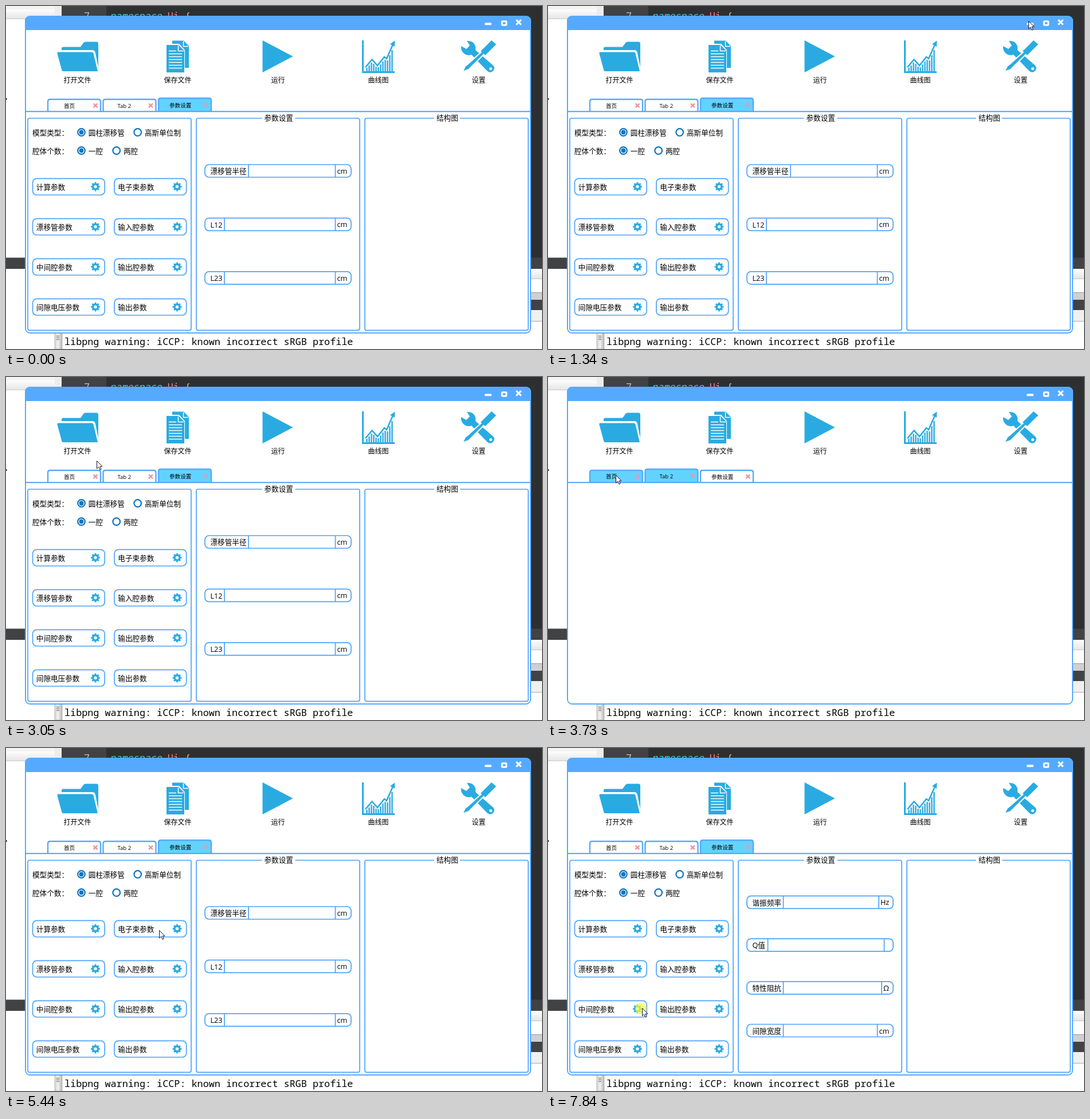
Write an HTML page that moves like this. It is 935x599 px and loops after 8 s.

```html
<!DOCTYPE html>
<html lang="zh-CN">
<head>
<meta charset="utf-8">
<title>参数设置</title>
<style>
html, body { margin: 0; width: 100%; height: 100%; overflow: hidden; background: #fff; }
svg { display: block; width: 935px; height: 599px; }
text { font-family: "Open Sans", "Noto Sans CJK SC", "Noto Sans CJK", sans-serif; font-size: 12.6px; fill: #000; white-space: pre; }
.label { font-size: 12px; text-anchor: middle; }
.tab { font-size: 9.6px; }
.mono { font-family: "Noto Sans Mono", "DejaVu Sans Mono", monospace; font-size: 16.8px; }
.line { fill: none; stroke: #4da3fa; stroke-width: 1.7; }
.icon { fill: #29abe2; }
</style>
</head>
<body>
<svg id="stage" viewBox="0 0 935 599" xmlns="http://www.w3.org/2000/svg">
  <defs>
    <linearGradient id="pale" x2="0" y2="1"><stop stop-color="#fdfdfd"/><stop offset="1" stop-color="#e6e6e8"/></linearGradient>
    <linearGradient id="bar"><stop stop-color="#d2d2d2"/><stop offset=".45" stop-color="#f2f2f2"/><stop offset="1" stop-color="#b4b4b4"/></linearGradient>
    <g id="gear" fill="none" stroke="#29abe2">
      <circle r="4.5" stroke-width="3.4"/>
      <circle r="6.7" stroke-width="2.4" pathLength="16" stroke-dasharray="1" stroke-dashoffset=".5"/>
    </g>
    <path id="cross" d="M-3.4-3.4L3.4 3.4M3.4-3.4L-3.4 3.4" stroke-width="2.4"/>
  </defs>
  <g id="desktop"></g>
  <g id="window"></g>
  <g id="icons"></g>
  <g id="tabs"></g>
  <path d="M34 184.3H915" class="line" style="stroke-width:2"/>
  <g id="page"></g>
  <g id="popup">
    <rect x="120" y="135.5" width="23" height="23" rx="3.5" fill="#f56a6a"/>
    <g fill="none" stroke="#fff" stroke-width="1.3"><circle cx="130.5" cy="145.8" r="4.8"/><path d="M134 149.5L138.5 153.5"/></g>
  </g>
  <circle id="halo" r="10" fill="#ffff35" opacity=".68"/>
  <path id="cursor" d="M.5.5V14L3.7 11L6 16.2L8.2 15.2L6 10.2H10Z" fill="#fff" stroke="#16162a" stroke-width="1"/>
</svg>
<script>
const LOOP = 8000;
const BLUE = '#55aaff';
const $ = id => document.getElementById(id);
const rect = (x, y, w, h, fill, more = '') =>
  `<rect x="${x}" y="${y}" width="${w}" height="${h}" fill="${fill}" ${more}/>`;
const text = (x, y, s, more = '') => `<text x="${x}" y="${y}" ${more}>${s}</text>`;
const box = (x, y, w, h, r) => rect(x, y, w, h, '#fff', `rx="${r}" class="line"`);

// Each step keeps the earlier values it does not name.
const steps = [
  { t: 0, x: -50, y: 0, icon: -1, tab: 2, over: -1, form: 0, popup: 0, halo: 0 },
  { t: 660, x: 881, y: 33 },
  { t: 1010, x: 866, y: 22 },
  { t: 1340, x: 838, y: 26 },
  { t: 1690, x: 704, y: 72 },
  { t: 2020, x: 549, y: 88, icon: 2 },
  { t: 2400, x: 304, y: 92, icon: 1 },
  { t: 2720, x: 128, y: 92, icon: 0 },
  { t: 3050, x: 158, y: 146, icon: -1 },
  { t: 3400, x: 207, y: 172, over: 1 },
  { t: 3730, x: 118, y: 171, tab: 1, over: 0 },
  { t: 4080, x: 120, y: 172, tab: 0 },
  { t: 4410, x: 323, y: 170, over: 2, popup: .5 },
  { t: 4790, x: 309, y: 166, popup: 1 },
  { t: 5110, x: 305, y: 224, tab: 2, over: -1, popup: 0 },
  { t: 5440, x: 267, y: 318 },
  { t: 5810, x: 303, y: 320 },
  { t: 6130, x: 299, y: 342, form: 1 },
  { t: 6480, x: 290, y: 378 },
  { t: 6830, x: 296, y: 440 },
  { t: 7160, x: 299, y: 452, form: 2 },
  { t: 7510, x: 78, y: 452 },
  { t: 7840, x: 164, y: 454, halo: 1 }
];
steps.forEach((s, i) => { steps[i] = { ...steps[i - 1], ...s }; });

function drawDesktop() {
  const dark = '#2e2f30', mid = '#404244';
  $('desktop').innerHTML =
    rect(0, 0, 935, 599, '#fff') +
    rect(0, 0, 97, 6, '#f4f4f5') + rect(0, 6, 85, 16, 'url(#pale)') + rect(0, 22, 85, 1, '#c9c9cb') +
    rect(85, 0, 12, 30, '#ededee') +
    rect(97, 0, 838, 440, dark) + rect(97, 0, 78, 40, mid) +
    text(136, 23, '7', 'class="mono" style="fill:#bebec0"') +
    text(181, 23, '<tspan fill="#45c6d6" font-style="italic">namespace</tspan> <tspan fill="#ff8080">Ui</tspan> <tspan fill="#d6cf9a">{</tspan>', 'class="mono"') +
    rect(0, 439.5, 935, 19.5, mid) +
    rect(0, 161, 1.5, 3, '#222') +
    rect(900, 459, 35, 17, 'url(#pale)') + rect(900, 476, 35, 1, '#c4c4c4') +
    rect(900, 500, 35, 1, '#999') + rect(900, 501, 35, 12, '#d0d0d2') +
    rect(900, 513, 35, 18, mid) + rect(900, 531, 35, 19, '#f0f0f0') + rect(900, 550, 35, 1, '#aaa') +
    rect(85, 560, 13, 39, 'url(#bar)', 'stroke="#aaa" stroke-width=".7"') +
    [576, 579, 582].map(y => rect(88, y, 5, 1, '#666')).join('') +
    text(102, 592, 'libpng warning: iCCP: known incorrect sRGB profile', 'class="mono"');
}

function drawWindow() {
  $('window').innerHTML =
    `<rect x="34" y="18" width="881" height="553" rx="8" fill="#fff" stroke="${BLUE}" stroke-width="2"/>` +
    `<path d="M33 42V27Q33 17 43 17H906Q916 17 916 27V42Z" fill="${BLUE}"/>` +
    rect(835, 29.3, 12, 4, '#fff', 'rx="1.5"') +
    rect(865.2, 26.7, 7.6, 6.6, 'none', 'rx="1" stroke="#fff" stroke-width="3"') +
    '<use href="#cross" stroke="#fff" transform="translate(894.3 28.4) scale(1.25)"/>';
}

const art = [
  // folder
  `<path d="M97 76V74Q97 71.500 100 71.500H130L135 64.500Q136.500 62.500 139 62.500H158Q161 62.500 161 66V107L156 82Q155 77 151 77H97Z"/>
   <path d="M91 80.500H150Q152 80.500 152.600 83L160 114H100Q97.500 114 97 111L89.500 83Q89 80.500 91 80.500Z"/>`,
  // documents
  `<path d="M290 60.500H310L319 70V108H312V77L302 66H290Z"/><path d="M309.500 61.500V70.500H318" fill="none" stroke="#fff" stroke-width="1.500"/>
   <path d="M280 68H301L311 78V116H280Z"/><path d="M300.500 69V78.500H310" fill="none" stroke="#fff" stroke-width="1.500"/>
   <path d="M284 78.500H297M284 83.500H307M284 88.500H307M284 93.500H307M284 98.500H307M284 103.500H307M284 108.500H307" stroke="#fff" stroke-width="1.700"/>`,
  // play
  '<path d="M447.500 60L500.500 88L447.500 116Z"/>',
  // chart
  `<path d="M622.500 60V115.500H678" fill="none" stroke="#29abe2" stroke-width="3"/>
   <path d="M627 107L638.500 93.500L648 104L660 89L664 92L675 67" fill="none" stroke="#29abe2" stroke-width="2.600"/>
   <path d="M678.500 60.500L678 71L670 66.500Z"/>
   <path d="M629.500 115V108M633.500 115V104M637.500 115V99M641.500 115V101M645.500 115V106M649.500 115V107M653.500 115V102M657.500 115V97M661.500 115V94M665.500 115V95M669.500 115V86M673.500 115V77" stroke="#29abe2" stroke-width="2.400"/>`,
  // tools
  `<path d="M794 70L803 75L809 69L804 61Q814 60 818 68Q820 72 819 77L850 104Q854 109 849 114Q844 118 839 113L812 85Q803 88 797 81Q793 76 794 70Z"/>
   <circle cx="845.500" cy="109.500" r="2.500" fill="#fff"/>
   <path d="M796 115L801 105L805 102L834 76L838 80L811 107L807 111Z" stroke="#fff" stroke-width="2"/>
   <path d="M847 60L855 67L836 86L828 79Z"/>`
];
const labels = ['打开文件', '保存文件', '运行', '曲线图', '设置'];

function drawIcons() {
  $('icons').innerHTML = art.map((a, i) =>
    `<g class="icon">${a}</g>` + text(124.5 + 175 * i, 134, labels[i], 'class="label"')).join('');
}

const tabNames = ['首页', 'Tab 2', '参数设置'];
const tabText = [101, 194.5, 285];

function drawTabs(s) {
  $('tabs').innerHTML = tabNames.map((name, i) => {
    const x = 73 + i * 96.5, on = s.tab === i, lit = on || s.over === i, top = on ? 161 : 163;
    return `<path d="M${x} 185V${top + 4}Q${x} ${top} ${x + 4} ${top}H${x + 88}Q${x + 92} ${top} ${x + 92} ${top + 4}V185" fill="${lit ? '#62d3ff' : '#fff'}" stroke="${BLUE}" stroke-width="2.4"/>` +
      text(tabText[i], lit ? 176.7 : 177.5, name, 'class="tab"') +
      `<use href="#cross" stroke="${lit ? '#d5a0bd' : '#f0919d'}" transform="translate(${x + 83} ${on ? 172.6 : 173.8})"/>`;
  }).join('');
}

const radio = (x, y, on, s) =>
  `<circle cx="${x}" cy="${y}" r="6.3" fill="#fff" stroke="#0d76c2" stroke-width="2.2"/>` +
  (on ? `<circle cx="${x}" cy="${y}" r="3.9" fill="#0d76c2"/>` : '') + text(x + 12.3, y + 5, s);

const group = (x, title, tx, gap) => box(x, 196, 285, 370.3, 3) +
  (title ? rect(tx - 4, 193, gap, 6, '#fff') + text(tx, 200, title) : '');

const buttons = ['计算参数', '电子束参数', '漂移管参数', '输入腔参数', '中间腔参数', '输出腔参数', '间隙电压参数', '输出参数'];

const button = (name, i) => {
  const x = 46.5 + (i % 2) * 142.5, y = 301.3 + (i >> 1) * 70;
  return box(x, y, 125.7, 28.7, 7) + text(x + 6.3, y + 19.3, name) +
    `<use href="#gear" x="${x + 109.5}" y="${y + 14.2}"/>`;
};

// Rows: label, label divider, unit, unit divider.
const forms = [
  { y: 288, gap: 93.4, rows: [['漂移管半径', 423, 'cm', 574.5], ['L12', 381, 'cm', 574.5], ['L23', 381, 'cm', 574.5]] },
  { y: 269.4, gap: 74.7, rows: [['电压', 385.5, 'KV', 576], ['电流', 385.5, 'KA', 576], ['内径', 385.5, 'cm', 574.5], ['外径', 385.5, 'cm', 574.5]] },
  { y: 269.4, gap: 74.7, rows: [['谐振频率', 410.5, 'Hz', 577], ['Q值', 383.5, '', 586.5], ['特性阻抗', 410.5, 'Ω', 582], ['间隙宽度', 410.5, 'cm', 574.5]] }
];

const field = ([name, a, unit, b], y) => box(347, y - 11, 255, 22, 7) +
  `<path d="M${a} ${y - 11}V${y + 11}M${b} ${y - 11}V${y + 11}" class="line"/>` +
  text(356.5, y + 5.3, name) + text(b + 3, y + 5, unit);

function drawPage(s) {
  const f = forms[s.form];
  $('page').innerHTML = s.tab !== 2 ? '' :
    group(38, '') + group(332, '参数设置', 450.5, 58) + group(626, '结构图', 751, 45) +
    text(46, 225.5, '模型类型：') + radio(131.5, 220.5, true, '圆柱漂移管') + radio(229.7, 220.5, false, '高斯单位制') +
    text(46, 257.5, '腔体个数：') + radio(131.5, 252.5, true, '一腔') + radio(192.7, 252.5, false, '两腔') +
    buttons.map(button).join('') +
    f.rows.map((r, i) => field(r, f.y + i * f.gap)).join('');
}

function draw(s) {
  drawTabs(s);
  drawPage(s);
  document.querySelectorAll('.icon').forEach((g, i) => {
    const cx = 124 + 175 * i;
    g.setAttribute('transform', s.icon === i ? `translate(${cx} 86.5) scale(1.06) translate(${-cx} -88)` : '');
  });
  $('popup').setAttribute('opacity', s.popup);
  $('halo').setAttribute('visibility', s.halo ? 'visible' : 'hidden');
  $('halo').setAttribute('transform', `translate(${s.x - 2} ${s.y + 1})`);
  $('cursor').setAttribute('transform', `translate(${s.x} ${s.y})`);
}

let shown = null;
function tick() {
  const t = (performance.now() - start) % LOOP;
  const s = steps.findLast(step => step.t <= t);
  if (s !== shown) draw(shown = s);
  requestAnimationFrame(tick);
}

drawDesktop();
drawWindow();
drawIcons();
const start = performance.now();
tick();
</script>
</body>
</html>
```
